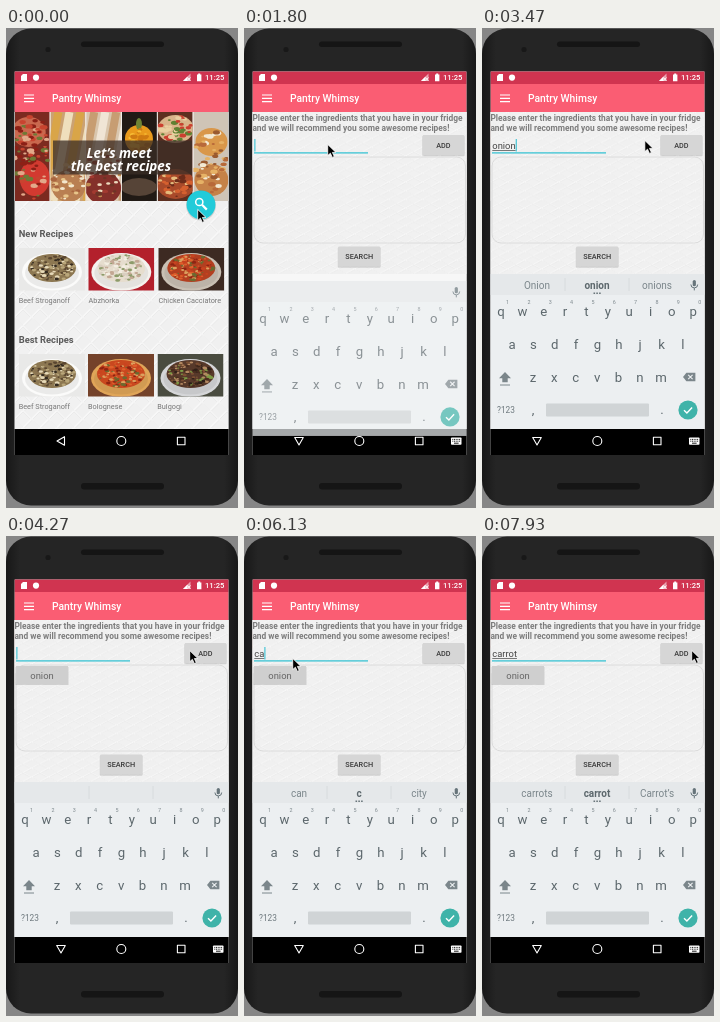
These frames come from a looping animation (232 by 480 pixels, 8000 ms). An HTML page:

```html
<!DOCTYPE html>
<html lang="en">
<head>
<meta charset="utf-8">
<title>Recipe app demo</title>
<style>
html, body { margin: 0; width: 100%; height: 100%; overflow: hidden; background: #868686; }
svg { display: block; width: 232px; height: 480px; font-family: Roboto, "Noto Sans", sans-serif; }
.mid { text-anchor: middle; }
.cap { font-size: 7.3px; fill: #777; }
.head { font-size: 9.4px; font-weight: 700; fill: #5a5a5a; }
.note { font-size: 8.37px; font-weight: 700; fill: #7c7c7c; }
.btn { font-size: 7.3px; font-weight: 500; fill: #3a3a3a; text-anchor: middle; }
.key { font-size: 13.2px; fill: #5c676c; text-anchor: middle; }
.num { font-size: 5.4px; fill: #7d888d; text-anchor: middle; }
.sug { font-size: 10px; fill: #7b868b; text-anchor: middle; }
.hero { font: italic 700 13.4px "Open Sans", sans-serif; fill: #fff; text-anchor: middle; }
</style>
</head>
<body>
<svg viewBox="0 0 232 480">
  <defs>
    <clipPath id="screen"><rect x="8.7" y="43.5" width="213.7" height="383.5"/></clipPath>
    <clipPath id="body"><rect x="8" y="84" width="215" height="317"/></clipPath>
    <linearGradient id="shell">
      <stop offset="0" stop-color="#181818"/><stop offset=".06" stop-color="#252525"/>
      <stop offset=".94" stop-color="#252525"/><stop offset="1" stop-color="#181818"/>
    </linearGradient>
    <pattern id="quilt" width="17" height="17" patternUnits="userSpaceOnUse">
      <rect width="17" height="17" fill="#f1f1f1"/>
      <path d="M8.5 0L17 8.5L8.5 17L0 8.5Z" fill="#f0f0f0"/>
      <path d="M0 8.5L8.5 0M8.5 17L17 8.5" stroke="#f8f8f8" stroke-width="1.6"/>
      <path d="M8.5 0L17 8.5M0 8.5L8.5 17" stroke="#f5f5f5" stroke-width="1.3"/>
      <path d="M1.5 9L9 1.5M10 17L17 10M0 10L7 17M10 1.5L17 8.5" stroke="#eaeaea" stroke-width=".9"/>
    </pattern>
  </defs>

  <!-- phone -->
  <rect x="0" y=".5" width="232" height="477" rx="25" fill="url(#shell)"/>
  <rect x="75" y="13.5" width="83" height="5.5" rx="2.7" fill="#151515"/>
  <rect x="75" y="455" width="83" height="6.5" rx="3" fill="#151515"/>
  <circle cx="42" cy="21.5" r="2.6" fill="#181818"/>

  <g clip-path="url(#screen)">
    <rect x="8" y="43" width="215" height="384" fill="#f7f7f7"/>
    <g id="home" clip-path="url(#body)"></g>
    <g clip-path="url(#body)"><g id="page"></g></g>

    <!-- status bar and toolbar -->
    <rect x="8" y="56" width="215" height="28" fill="#fa5d73"/>
    <rect x="8" y="43" width="215" height="13" fill="#d03450"/>
    <path d="M15 48l2-2h4v7h-6z" fill="#fff"/>
    <circle cx="30" cy="49.6" r="3.1" fill="#fff"/>
    <path d="M177 53h7.5v-7.5z" fill="#fff" opacity=".55"/>
    <path d="M177 53h4.5v-4.5z" fill="#fff"/>
    <path d="M181.5 49.5l3 3.5m0-3.5l-3 3.5" stroke="#fff" stroke-width=".9"/>
    <path d="M191 46.5h1.2v-1h2v1h1.2v6.8h-4.4z" fill="#fff"/>
    <text x="199" y="52.2" font-size="7.6" font-weight="500" fill="#fff">11:25</text>
    <path d="M18 67h10M18 70.3h10M18 73.6h10" stroke="#fff" stroke-width="1.2"/>
    <text x="46" y="74" font-size="10.3" font-weight="500" fill="#fff">Pantry Whimsy</text>

    <!-- navigation bar -->
    <rect x="8" y="401" width="215" height="26" fill="#000"/>
    <g fill="none" stroke="#fff" stroke-width="1.1" stroke-linejoin="round">
      <path id="back" d="M51 413l7.5-4.3v8.6z"/>
      <circle cx="115.3" cy="413" r="4.5"/>
      <rect x="171.4" y="409.2" width="7.6" height="7.6"/>
    </g>
    <g id="kbIcon">
      <rect x="207" y="409.5" width="10.5" height="7.2" rx=".8" fill="#fff"/>
      <path d="M208.3 411.4h8M208.3 413.2h8" stroke="#000" stroke-width=".9" stroke-dasharray="1 .7"/>
      <path d="M210 415.2h4.6" stroke="#000" stroke-width=".9"/>
    </g>
    <g id="kb"></g>
  </g>
  <path id="mouse" d="M0 0V11.2L2.7 8.8L4.6 13L6.6 12.1L4.7 8H8.2Z" fill="#000" stroke="#fff" stroke-width=".8"/>
</svg>
<script>
const $ = id => document.getElementById(id);
const LOOP = 8000;

let seed = 1;
const rnd = () => (seed = seed * 16807 % 2147483647) / 2147483647;
const text = (x, y, cls, s) => `<text x="${x}" y="${y}" class="${cls}">${s}</text>`;
const rect = (x, y, w, h, fill, more = '') =>
  `<rect x="${x}" y="${y}" width="${w}" height="${h}" fill="${fill}" ${more}/>`;
const oval = (x, y, rx, ry, fill) =>
  `<ellipse cx="${x.toFixed(1)}" cy="${y.toFixed(1)}" rx="${rx}" ry="${ry}" fill="${fill}"/>`;

// bits of food scattered over an ellipse
function scatter(cx, cy, rx, ry, n, colors, size) {
  let out = '';
  for (let i = 0; i < n; i++) {
    const a = rnd() * 6.283, r = Math.sqrt(rnd());
    const s = size * (0.5 + rnd());
    out += oval(cx + Math.cos(a) * r * rx, cy + Math.sin(a) * r * ry,
      s.toFixed(1), (s * 0.6).toFixed(1), colors[i % colors.length]);
  }
  return out;
}
function frame(x, y, w, h, inner) {
  return `<svg x="${x}" y="${y}" width="${w}" height="${h}" viewBox="0 0 ${w} ${h}">${inner}</svg>`;
}
function dish(x, y, bg, plate, base, bits, start) {
  seed = start;
  return frame(x, y, 66, 42.5, rect(0, 0, 66, 43, bg) +
    oval(33, 24, 30, 19, plate) + oval(33, 25, 27, 15.5, '#0001') +
    oval(33, 20, 24, 14, base) + scatter(33, 20, 22, 13, 130, bits, 1.7));
}
function strip(i, bg, inner) {
  return frame(8.7 + i * 35.75, 84, 34.9, 89, rect(0, 0, 35, 89, bg) + inner);
}

function banner() {
  seed = 77;
  const bars = (a, b) => Array.from({ length: 5 }, (_, i) =>
    `<path d="M${i * 11 - 8} 89L${i * 11 + 8} 0" stroke="${i % 2 ? a : b}" stroke-width="8"/>`).join('');
  return rect(8, 84, 215, 89, '#f2eeea') +
    strip(0, '#7c2a20', oval(14, 20, 17, 15, '#c9684e') + oval(20, 66, 15, 18, '#d23a30') +
      scatter(17, 44, 18, 44, 90, ['#c8442f', '#8c2016', '#e2a98a', '#6d7a35'], 2.6)) +
    strip(1, '#cba273', bars('#efdfbd', '#d9a548') + oval(18, 74, 17, 16, '#b97f52') +
      scatter(18, 70, 18, 18, 40, ['#e8c58a', '#f3e6cd', '#a9653f'], 2.2)) +
    strip(2, '#d9c6ae', bars('#f0e5d6', '#c79d72') + oval(17, 76, 18, 16, '#84302a') +
      scatter(17, 60, 17, 28, 45, ['#ecd9bd', '#a23a30', '#c28c50', '#6c3426'], 2.4)) +
    strip(3, '#211a15', oval(17, 27, 14, 14, '#e99a1c') + oval(17, 75, 18, 9, '#564437') +
      oval(17, 12, 3, 6, '#6f8434') +
      scatter(17, 28, 12, 12, 24, ['#f7bd35', '#cf7a12'], 2.6)) +
    strip(4, '#5d2f20', oval(18, 17, 18, 14, '#d9b48a') + oval(18, 72, 19, 15, '#a94a2a') +
      scatter(18, 17, 16, 13, 40, ['#cb4030', '#e9cfa0', '#5f8133'], 2.4) +
      scatter(18, 71, 17, 14, 40, ['#d5602f', '#e6bb7c', '#6c2c1a'], 2.4)) +
    strip(5, '#cfc4b6', oval(18, 30, 16, 14, '#d9974a') + oval(18, 68, 17, 16, '#c58248') +
      scatter(18, 48, 17, 34, 55, ['#e6b266', '#9a5a30', '#f3e8d2', '#b8693a'], 2.6)) +
    rect(47, 112.5, 139, 34, '#3a2d26', 'opacity=".75"') +
    text(113, 130, 'hero', 'Let’s meet') + text(115, 143, 'hero', 'the best recipes');
}

const quilt = rect(8, 84, 215, 317, 'url(#quilt)');
const stew = ['#5a4630', '#e6d9b8', '#8a7350', '#332a20', '#b9a67a'];
const red = ['#c9431f', '#8f2412', '#e0602c', '#dca05e', '#6b6a2f'];
const salad = ['#4a2c1e', '#7c4f33', '#2f2018', '#7d9b45', '#b58a62'];
const porridge = ['#f3eee2', '#d9cfc0', '#c3a793', '#8d9b6a'];

$('home').innerHTML = quilt + banner() +
  text(12.7, 209, 'head', 'New Recipes') +
  dish(13, 220, '#e9e9e8', '#fbfbfa', '#8d7852', stew, 11) +
  dish(82.3, 220, '#b3202c', '#f4f2ee', '#e6ddce', porridge, 23) +
  dish(152.3, 220, '#3d2a22', '#c9c0b4', '#b33f20', red, 37) +
  text(12.7, 275, 'cap', 'Beef Stroganoff') + text(82.6, 275, 'cap', 'Abzhorka') +
  text(152.6, 275, 'cap', 'Chicken Cacciatore') +
  text(12.7, 315, 'head', 'Best Recipes') +
  dish(13, 326, '#e9e9e8', '#fbfbfa', '#8d7852', stew, 11) +
  dish(82, 326, '#74422a', '#e0a558', '#c9481f', red, 53) +
  dish(151.5, 326, '#4a4c40', '#d5d6d8', '#57392a', salad, 71) +
  text(12.7, 381, 'cap', 'Beef Stroganoff') + text(82, 381, 'cap', 'Bolognese') +
  text(151.3, 381, 'cap', 'Bulgogi') +
  `<circle cx="195" cy="177.6" r="15" fill="#0002"/><circle cx="195" cy="176.8" r="14.4" fill="#22cbd9"/>
   <circle id="ripple" cx="195" cy="176.8" r="0" fill="#fff"/>
   <circle cx="193.3" cy="174" r="3.6" fill="none" stroke="#fff" stroke-width="1.5"/>
   <path d="M196 176.8l4.8 4.8" stroke="#fff" stroke-width="2.2"/>`;

const button = (id, x, y, w, h, label) => `<g id="${id}">` +
  rect(x - .4, y + .8, w + .8, h + .4, '#0002', 'rx="1.2"') + rect(x, y, w, h, '#d6d6d6', 'rx="1"') +
  text(x + w / 2, y + h / 2 + 2.6, 'btn', label) + '</g>';

$('page').innerHTML = rect(8, 84, 215, 317, '#f7f7f7') + `<g id="bg">${quilt}</g>` +
  text(8.4, 93.3, 'note', 'Please enter the ingredients that you have in your fridge') +
  text(8.4, 103, 'note', 'and we will recommend you some awesome recipes!') +
  '<text id="input" x="10.3" y="120.8" font-size="9.4" fill="#444"></text>' +
  rect(10.3, 122, 0, .7, '#444', 'id="under"') +
  rect(10, 124.3, 114, .8, '#999', 'id="line"') +
  rect(10, 111, 1, 12.5, '#26bccf', 'id="caret"') +
  button('add', 178.7, 107, 41.5, 20, 'ADD') +
  rect(10, 129, 211.5, 241, 'none', 'id="list" rx="9" stroke="#d9d9d9" stroke-width=".9"') +
  `<g id="chip">${rect(9.5, 131, 53, 18, '#0002')}${rect(10, 130, 52, 18, '#cfcfcf')}
   <text x="36" y="142.8" class="mid" font-size="9.4" fill="#666">onion</text></g>` +
  button('search', 94.2, 373, 42, 20, 'SEARCH');

const row = (letters, x, y) => [...letters].map((c, i) => text((x + i * 21.35).toFixed(1), y, 'key', c)).join('');
$('kb').innerHTML = rect(8, 246, 215, 155, '#eceff1') + rect(8, 246, 215, 21, '#e5e8ea') +
  `<path id="split" d="M83 250v13M147 250v13" stroke="#d5d9db" stroke-width=".8"/>` +
  [55, 115, 175].map((x, i) => `<text id="s${i}" x="${x}" y="260.6" class="sug"></text>`).join('') +
  `<path id="dots" d="M111.5 265.3h7.5" stroke="#69757a" stroke-width="1.5" stroke-dasharray="1.6 1.2"/>
   <rect x="210.7" y="252" width="3.2" height="6.3" rx="1.6" fill="#66747a"/>
   <path d="M208.9 256.5a3.4 3.4 0 0 0 6.8 0M212.3 260v2.4" fill="none" stroke="#66747a"/>` +
  row('qwertyuiop', 19, 288) + row('asdfghjkl', 30, 321) + row('zxcvbnm', 51, 354) +
  [...'1234567890'].map((c, i) => text((25.5 + i * 21.35).toFixed(1), 276, 'num', c)).join('') +
  `<path d="M23 344l6 6.3h-3.3v4h-5.4v-4h-3.3z" fill="#7b868b"/><path d="M18 357h10" stroke="#7b868b" stroke-width="1"/>
   <path d="M201 349l3.4-4.2h9v8.4h-9z" fill="#7b868b"/>
   <path d="M206.2 346.8l4.4 4.4m0-4.4l-4.4 4.4" stroke="#eceff1" stroke-width="1.1"/>
   <text x="24" y="385" class="mid" font-size="8.3" fill="#6d787d">?123</text>` +
  text(51, 386, 'key', ',') + text(180, 386, 'key', '.') +
  rect(64, 375.5, 103, 13, '#d0d4d6', 'rx="1"') +
  `<circle cx="206" cy="382" r="9.6" fill="#3fb3a9"/>
   <path d="M202 382.2l2.9 2.8l5.2-5.6" fill="none" stroke="#fff" stroke-width="1.4"/>`;

// [time, value] lists
const typed = [[0, ''], [2270, 'o'], [2470, 'on'], [2670, 'oni'], [2870, 'onio'], [3130, 'onion'], [4130, ''],
  [5870, 'c'], [6130, 'ca'], [6400, 'car'], [6600, 'carr'], [6800, 'carro'], [7000, 'carrot']];
const hints = [[0, ''], [2400, 'of o on'], [2600, 'in on one'], [2800, 'on oni onion'], [3000, 'Onion onion onions'],
  [4130, ''], [6000, 'can c city'], [6270, 'can ca car'], [6530, 'cat car care'],
  [6730, 'Carr carr carry'], [6930, 'Carr carro carrot'], [7130, 'carrots carrot Carrot’s']];
const pointer = [[0, 191, 181], [740, 191, 181], [930, 102, 112], [1450, 83, 116], [3130, 83, 116], [3470, 162, 112],
  [3800, 203, 113], [4200, 203, 113], [4750, 48, 122], [7230, 48, 122], [7900, 209, 114]];
const slide = [[1600, 18, .12], [1730, 15, .3], [1800, 7, .7], [1930, 0, 1]];
const FOCUS = 1530, RESIZE = 1600, REFOCUS = 4870;

const last = (list, t) => list.filter(k => k[0] <= t).pop() || list[0];
function tween(list, t) {
  const a = last(list, t), b = list[list.indexOf(a) + 1] || a;
  const p = a === b ? 0 : Math.max(0, (t - a[0]) / (b[0] - a[0]));
  return [1, 2].map(i => a[i] + (b[i] - a[i]) * p);
}
const ramp = (t, from, to) => Math.min(1, Math.max(0, (t - from) / (to - from)));
const set = (id, attrs) => { for (const k in attrs) $(id).setAttribute(k, attrs[k]); };
const show = (id, on) => set(id, { visibility: on ? 'visible' : 'hidden' });

function render(t) {
  const grow = ramp(t, 70, 330), enter = ramp(t, 270, 530);
  set('ripple', { r: 14.4 * grow, opacity: .35 * (1 - enter) });
  set('page', { transform: `translate(0 ${26 * (1 - enter) ** 3})`, opacity: enter });

  const open = t >= RESIZE, focus = t >= FOCUS;
  set('bg', { transform: open ? 'translate(0 84) scale(1 .511) translate(0 -84)' : '' });
  set('list', { height: open ? 86 : 241 });
  set('search', { transform: open ? 'translate(0 -154.5)' : '' });
  set('line', { fill: focus ? '#2cc0d2' : '#999', height: focus ? 1.2 : .8 });
  set('back', { transform: open ? 'rotate(-90 55 413)' : '' });
  show('kbIcon', open);

  const [dy, alpha] = tween(slide, t);
  show('kb', open);
  set('kb', { transform: `translate(0 ${dy})`, opacity: alpha });

  const [keyTime, word] = last(typed, t);
  $('input').textContent = word;
  const w = word ? $('input').getComputedTextLength() : 0;
  set('under', { width: w });
  const since = t - Math.max(keyTime, FOCUS, t >= REFOCUS ? REFOCUS : 0);
  set('caret', { x: 10.4 + w });
  show('caret', focus && since % 1000 < 500);

  const words = last(hints, t)[1].split(' ');
  for (let i = 0; i < 3; i++) $('s' + i).textContent = words[i] || '';
  set('s1', { 'font-weight': 700, style: 'fill:#5c676c' });
  $('dots').style.display = words[0] ? '' : 'none';
  $('split').style.display = t >= 2400 ? '' : 'none';

  $('chip').style.display = t >= 4130 ? '' : 'none';
  $('add').children[1].setAttribute('fill', t >= 4000 && t < 4200 ? '#bebebe' : '#d6d6d6');

  const [mx, my] = tween(pointer, t);
  set('mouse', { transform: `translate(${mx + .7} ${my + .4})` });
}

const start = performance.now();
function tick() {
  render((performance.now() - start) % LOOP);
  requestAnimationFrame(tick);
}
tick();
</script>
</body>
</html>
```
